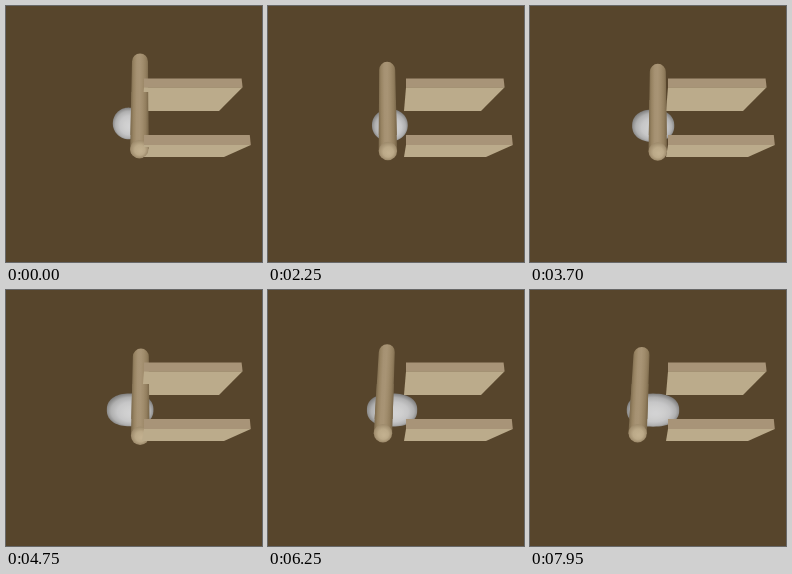
Recreate the animation shown at these times as an HTML page with a canvas. Size 256 px wide and 256 px high, loop 8000 ms.

```html
<!DOCTYPE html>
<html lang="en">
<head>
<meta charset="utf-8">
<title>Rod and planks</title>
<style>
  html, body { margin: 0; width: 100%; height: 100%; overflow: hidden; background: #57452c; }
  canvas { display: block; width: 256px; height: 256px; }
</style>
</head>
<body>
<canvas id="stage" width="256" height="256"></canvas>
<script>
const ctx = document.getElementById('stage').getContext('2d');
const LOOP = 8000, STEP = 50, KICK = 6150;

const decay = (t, span) => Math.exp(-t / span);
const smooth = (t, from, to) => {
  const u = Math.min(1, Math.max(0, (t - from) / (to - from)));
  return u * u * (3 - 2 * u);
};

// The rod sways while it sinks, then is knocked aside and drifts left.
function rodPose(t) {
  if (t < KICK) {
    const x = 127.4 - 8.3 * Math.cos(Math.PI * (t - 2100) / 3100) + 2.2 * decay(t, 300);
    return {
      x1: x, x2: x - 0.09 * (x - 127),
      top: 59.6 - 12.2 * decay(t, 1900),
      bottom: 155.2 - 2.9 * decay(t, 2000)
    };
  }
  const s = t - KICK, x = 119.2 - 0.0043 * s;
  return { x1: x, x2: x - 3.8, top: 57 - 3.4 * decay(s, 500), bottom: 152.4 };
}

// The pale body stretches to both sides.
function bodyBox(t) {
  return {
    left: 106.8 - 0.00126 * t,
    right: 138 + 11.2 * smooth(t, 1000, 6000),
    top: 103.6 - 2 * decay(t, 1500),
    bottom: 136.8 - 3.6 * decay(t, 2500)
  };
}

// Spread colours evenly over a gradient.
function blend(g, ...colors) {
  colors.forEach((c, i) => g.addColorStop(i / (colors.length - 1), c));
  return g;
}

function poly(color, ...pts) {
  ctx.fillStyle = color;
  ctx.beginPath();
  pts.forEach(([x, y]) => ctx.lineTo(x, y));
  ctx.fill();
}

function drawBody(t) {
  const { left, right, top, bottom } = bodyBox(t);
  const power = 2 + 0.35 * smooth(t, 0, 6000);
  const bend = v => Math.sign(v) * Math.abs(v) ** (2 / power);
  ctx.save();
  ctx.translate((left + right) / 2, (top + bottom) / 2);
  ctx.scale((right - left) / 2, (bottom - top) / 2);
  ctx.beginPath();
  for (let a = 0; a < 2 * Math.PI; a += Math.PI / 36) {
    ctx.lineTo(bend(Math.cos(a)), bend(Math.sin(a)));
  }
  ctx.fillStyle = blend(ctx.createRadialGradient(0.1, 0.2, 0.1, 0, 0.04, 1.1),
    '#d2d2d3', '#cecece', '#c6c6c7', '#b0b0b0', '#767574');
  ctx.fill();
  ctx.restore();
}

function drawRod(t) {
  const { x1, x2, top, bottom } = rodPose(t);
  const r1 = 8, r2 = 9.2, y1 = top + r1, y2 = bottom - r2;
  const tilt = (x1 - x2) / (y2 - y1);

  ctx.save();
  ctx.transform(1, 0, -tilt, 1, x2 + tilt * y2, 0);
  ctx.fillStyle = blend(ctx.createLinearGradient(-r2, 0, r2, 0),
    '#7a684b', '#988463', '#a69273', '#a89475', '#a08c6c', '#927e5e', '#756346');
  ctx.beginPath();
  ctx.arc(0, y1, r1, Math.PI, 0);
  ctx.lineTo(r2, y2);
  ctx.lineTo(-r2, y2);
  ctx.fill();
  ctx.restore();

  ctx.fillStyle = blend(ctx.createRadialGradient(x2 + 1, y2 + 2, 1, x2, y2, r2),
    '#c2b08f', '#bba988', '#9c896a');
  ctx.beginPath();
  ctx.arc(x2, y2, r2, 0, 7);
  ctx.fill();
}

function drawPlank(right, top, edge, bottom, tip) {
  poly('#bbab8b', [138, edge], [right + 1, edge], [tip, bottom], [136, bottom]);
  poly('#a89478', [138, top], [right, top], [right + 1, edge], [138, edge]);
}

// Parts of the rod that stand out in front of the planks.
function drawRodFront(t) {
  const early = t < 1100, cut = early ? 86 : 94;
  ctx.save();
  ctx.beginPath();
  ctx.rect(0, cut, 256, 129 - cut);
  if (early) ctx.rect(0, 141, 256, 20);
  ctx.clip();
  drawRod(t);
  ctx.restore();
}

function draw(t) {
  ctx.fillStyle = '#57452c';
  ctx.fillRect(0, 0, 256, 256);
  drawBody(t);
  drawRod(t);
  drawPlank(235.6, 72.5, 81.2, 105, 213);
  drawPlank(243.8, 129, 139, 151, 218);
  drawRodFront(t);
}

const start = performance.now();
function tick() {
  const t = (performance.now() - start) % LOOP;
  draw(Math.floor(t / STEP) * STEP);
  requestAnimationFrame(tick);
}
tick();
</script>
</body>
</html>
```
